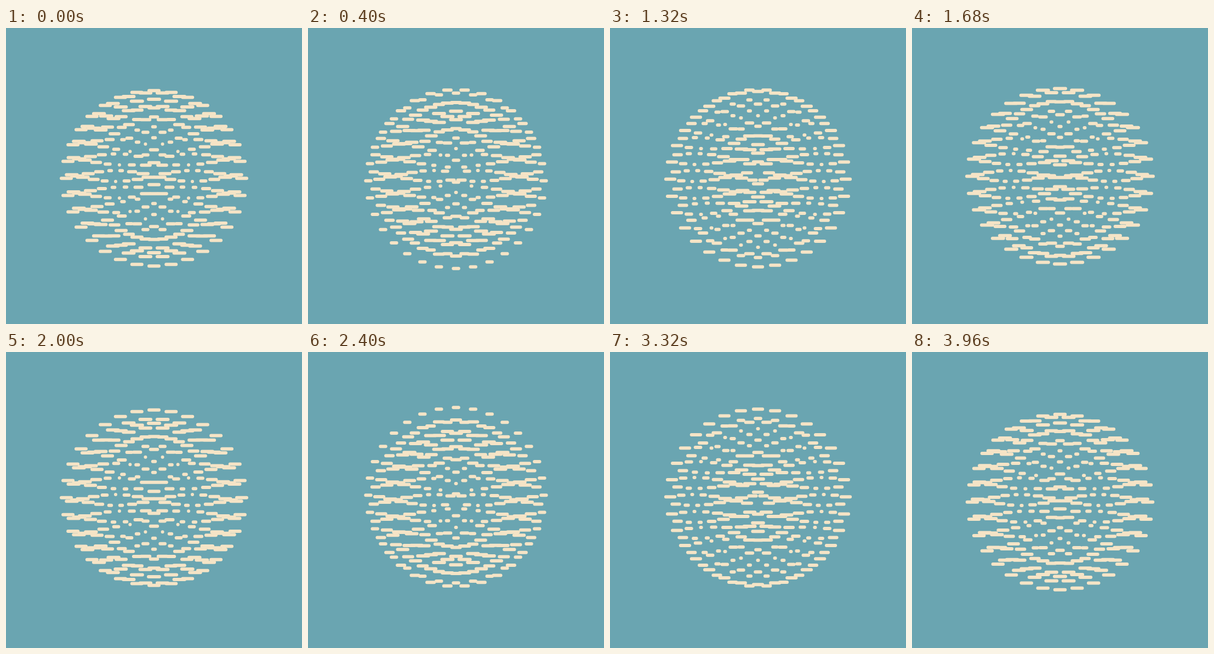
These frames come from a looping animation (540 px wide and 540 px high, 4 s). An HTML page with a canvas:

```html
<!DOCTYPE html>
<html lang="en">
<head>
<meta charset="utf-8">
<title>Dash ripple</title>
<style>
  html, body { margin: 0; width: 100%; height: 100%; overflow: hidden; background: #6aa5b1; }
  canvas { display: block; width: 100vw; height: 100vh; }
</style>
</head>
<body>
<canvas id="stage" width="540" height="540"></canvas>
<script>
const LOOP = 4000;
const TAU = Math.PI * 2;
const CENTER = 270;
const RINGS = 16;
const GAP = 10;          // distance between rings
const SWING = 10;        // orbit radius of each dash end
const WAVELENGTH = 280;  // ripple length along the radius

const ctx = document.getElementById('stage').getContext('2d');

// Each dash joins two points that orbit in mirrored directions.
function drawRing(i, t) {
  const r = i * GAP;
  const count = 2 * i;
  const phase = TAU * (t + r / WAVELENGTH);
  const dir = i % 2 ? 1 : -1;
  const dy = dir * SWING * Math.sin(phase);
  const half = Math.max(0.01, SWING * Math.abs(Math.cos(phase)));

  for (let k = 0; k < count; k++) {
    const a = TAU * k / count;
    const x = CENTER + r * Math.cos(a);
    const y = CENTER + r * Math.sin(a) + dy;
    ctx.moveTo(x - half, y);
    ctx.lineTo(x + half, y);
  }
}

function draw(t) {
  ctx.fillStyle = '#6aa5b1';
  ctx.fillRect(0, 0, 540, 540);
  ctx.strokeStyle = '#f5e4c6';
  ctx.lineWidth = 6;
  ctx.lineCap = 'round';
  ctx.beginPath();
  for (let i = 1; i <= RINGS; i++) drawRing(i, t);
  ctx.stroke();
}

function tick() {
  draw((performance.now() % LOOP) / LOOP);
  requestAnimationFrame(tick);
}
tick();
</script>
</body>
</html>
```
